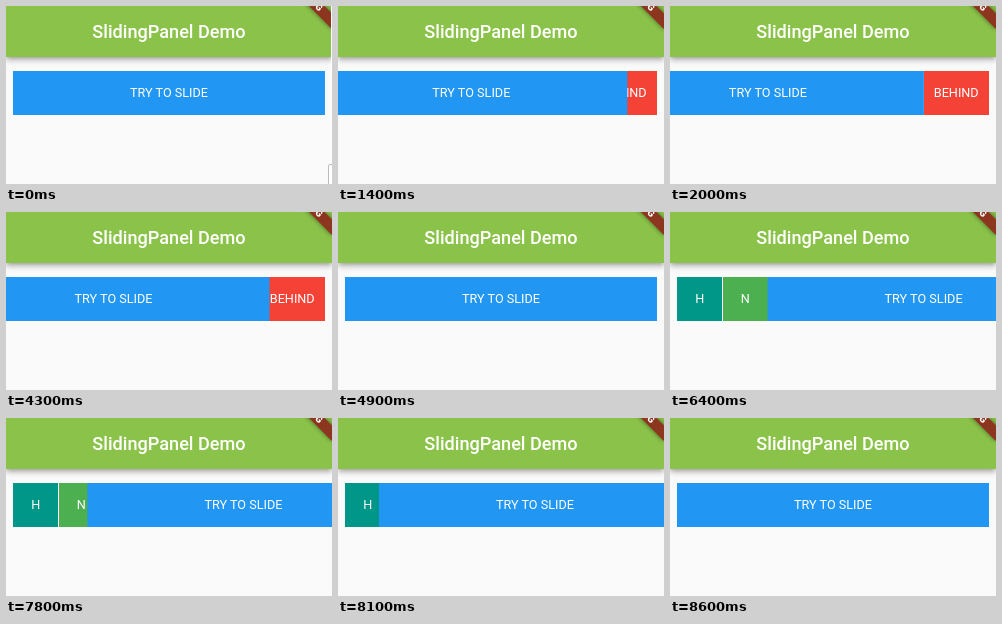
Animation of 326 by 178 pixels, one loop 9.9 s. Source, as an HTML page:

```html
<!DOCTYPE html>
<html lang="en">
<head>
<meta charset="utf-8">
<title>SlidingPanel Demo</title>
<style>
  html, body { margin: 0; width: 100%; height: 100%; overflow: hidden; }
  body { position: relative; background: #fafafa; color: #fff; font: 12.67px Roboto, sans-serif; }
  div { position: absolute; box-sizing: border-box; white-space: nowrap; }
  #bar {
    left: 0; top: 0; width: 326px; height: 50.7px; background: #8bc34a;
    font-size: 18.11px; font-weight: 500; line-height: 52px; text-align: center;
    box-shadow: 0 2px 4px -1px #0003, 0 4px 5px #00000024, 0 1px 9px #0000001f;
  }
  .cell { top: 65.2px; height: 43.5px; line-height: 43.5px; text-align: center; }
  #h { left: 7.2px; width: 45.3px; background: #009688; }
  #n { left: 52.5px; width: 45.3px; background: #4caf50; }
  #behind { left: 253.7px; width: 65.1px; background: #f44336; }
  #panel { left: 7.2px; width: 311.6px; background: #2196f3; }
  #banner {
    left: 268px; top: -11.8px; width: 72.4px; height: 10.9px; transform: rotate(45deg);
    background: linear-gradient(#b71c1ca0, #b71c1ca0), #0000007f;
    box-shadow: 0 0 5px #0000007f;
    font-size: 9.24px; font-weight: 900; line-height: 10.9px; text-align: center;
  }
  #edge { left: 325px; top: 0; width: 1px; height: 178px; background: #fff; }
  #tab {
    left: 322px; top: 158px; width: 8px; height: 24px; background: #fff;
    border: 1px solid #bbb; border-radius: 2px;
  }
</style>
</head>
<body>
<div id="bar">SlidingPanel Demo</div>
<div id="h" class="cell">H</div>
<div id="n" class="cell">N</div>
<div id="behind" class="cell">BEHIND</div>
<div id="panel" class="cell">TRY TO SLIDE</div>
<div id="banner">DEBUG</div>
<div id="edge"></div>
<div id="tab"></div>
<script>
const LOOP = 9900, TICK = 100, LEFT = -65.1, RIGHT = 90.6;
const get = id => document.getElementById(id);
const show = (id, on) => { get(id).style.visibility = on ? 'visible' : 'hidden'; };

// start, end, from, to, ease-out power
const slides = [
  [1100, 2000, 0, LEFT, 1.5],
  [4200, 4300, LEFT, -55.5, 1],
  [4300, 4500, -55.5, -12, 1],
  [4600, 4700, -12, -6, 1],
  [4800, 4900, -6, 0, 1],
  [5800, 6400, 0, RIGHT, 1.3],
  [7700, 8600, RIGHT, 0, 1.67],
];

function offsetAt(t) {
  let x = 0;
  for (const [start, end, from, to, power] of slides) {
    if (t < start) break;
    const left = Math.max(0, 1 - (t - start) / (end - start));
    x = to + (from - to) * left ** power;
  }
  return x;
}

function draw() {
  const t = Math.floor(performance.now() % LOOP / TICK) * TICK;
  const x = offsetAt(t);
  get('panel').style.transform = `translateX(${x}px)`;
  show('h', x > 0);
  show('n', x > 0);
  show('behind', x < 0);
  show('edge', t < TICK);
  show('tab', t < TICK);
  requestAnimationFrame(draw);
}
draw();
</script>
</body>
</html>
```
